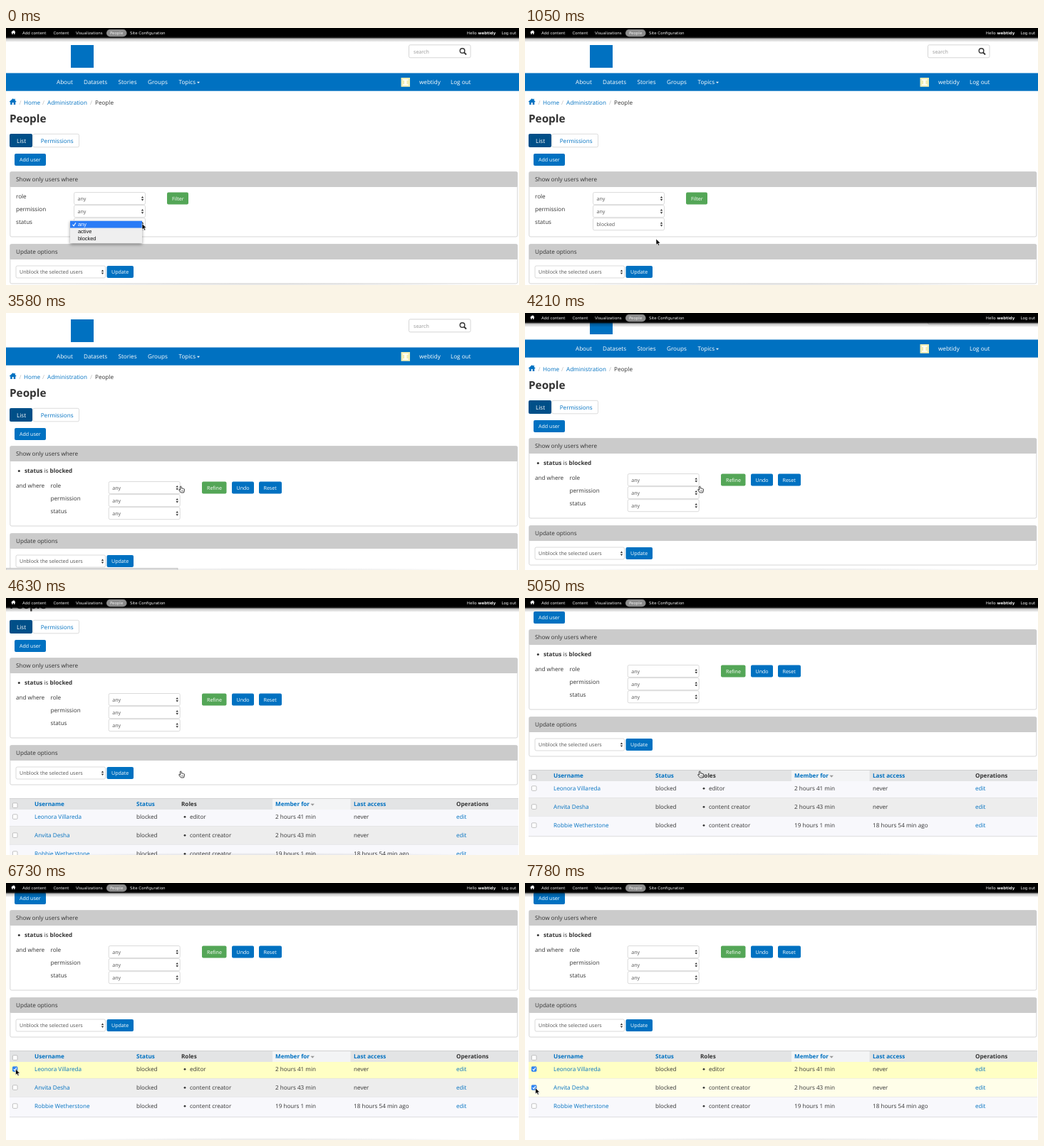
Animation of 720x362 px, one loop 7.99 s. Source, as an HTML page:

```html
<!DOCTYPE html>
<html lang="en">
<head>
<meta charset="utf-8">
<title>People</title>
<style>
html, body { margin: 0; width: 100%; height: 100%; overflow: hidden; background: #fff; }
svg { display: block; width: 720px; height: 362px; font: 8.15px "Open Sans", sans-serif; text-rendering: geometricPrecision; }
</style>
</head>
<body>
<svg id="stage" viewBox="0 0 720 362"></svg>
<script>
const BLUE = '#0071c1', GREEN = '#54a657', INK = '#333', USER = 'webtidy';

// Drawing helpers: each returns SVG markup
const rect = (x, y, w, h, fill, more = '') => `<rect x="${x}" y="${y}" width="${w}" height="${h}" fill="${fill}" ${more}/>`;
const text = (x, y, s, fill = INK, more = '') => `<text x="${x}" y="${y}" fill="${fill}" ${more}>${s}</text>`;
const path = (d, fill, more = '') => `<path d="${d}" fill="${fill}" ${more}/>`;
const group = (id, body, more = '') => `<g id="${id}" ${more}>${body}</g>`;
const small = (x, y, s, fill, more = '') => text(x, y, s, fill, 'font-size="7.1" ' + more);
const bold = 'font-weight="700"';

const button = (x, y, w, s, fill = BLUE, pad = 7) =>
  rect(x, y, w, 17, fill, 'rx="2"') + small(x + pad, y + 11.1, s, '#fff');

const select = (x, y, w, s, id = '') => {
  const ax = x + w - 4, ay = y + 8.7;
  return rect(x, y, w, 17, '#fff', 'rx="2" stroke="#ccc" stroke-width=".7"') +
    small(x + 5, y + 11.2, s, '#555', id && `id="${id}"`) +
    path(`M${ax - 1.7} ${ay - .8}h3.4l-1.7-2.5zM${ax - 1.7} ${ay + .8}h3.4l-1.7 2.5z`, INK);
};

const panel = (y, h, title) =>
  rect(5.8, y, 712, h, '#fff', 'rx="2" stroke="#ccc" stroke-width=".8"') +
  rect(5.5, y, 712.5, 21.5, '#cbcbcb', 'rx="1.5"') + text(14, y + 13.3, title);

const house = (x, y, s, fill) =>
  path('M0 4.6L5 0l1.9 1.7V.5h1.3v2.4L10 4.6l-.7.8L8.6 4.8V9H6V6H4v3H1.4V4.8l-.7.6z', fill, `transform="translate(${x} ${y}) scale(${s})"`);

const header =
  rect(91, 24, 32, 32, BLUE) +
  rect(565.5, 23.8, 86.5, 18, '#fff', 'rx="2" stroke="#ccc" stroke-width=".8"') +
  small(572, 35.5, 'search', '#999') +
  '<circle cx="640.5" cy="32" r="3.3" fill="none" stroke="#333" stroke-width="1.4"/>' +
  path('M643 34.5l3 3', 'none', 'stroke="#333" stroke-width="1.8"') +
  rect(0, 63.5, 720, 25.2, BLUE) +
  [[71, 'About'], [109, 'Datasets'], [157.5, 'Stories'], [199, 'Groups'], [242.5, 'Topics'], [580, USER], [624, 'Log out']]
    .map(([x, s]) => text(x, 79, s, '#fff')).join('') +
  path('M268 75.8h4l-2 2.2z', '#fff') +
  rect(554.5, 70, 12.5, 12.8, '#f1edb4') + path('M557 72h7.5v2h-2v5h2v2H557v-2h2v-5h-2z', '#fffef2') +
  house(4.8, 99.2, .98, BLUE) +
  [[18.5, '/', '#bbb'], [25, 'Home', BLUE], [51, '/', '#bbb'], [58, 'Administration', BLUE], [118, '/', '#bbb'], [125, 'People', INK]]
    .map(([x, s, c]) => text(x, 107.5, s, c)).join('') +
  text(5, 132.6, 'People', INK, bold + ' font-size="15.3"') +
  rect(5, 149, 32, 19, '#004f88', 'rx="2"') + text(15, 161.5, 'List', '#fff') +
  rect(38, 149.3, 64.5, 18.5, '#fff', 'rx="2" stroke="#d4d4d4" stroke-width=".8"') + text(48.7, 161.5, 'Permissions', BLUE) +
  button(12, 177, 44, 'Add user');

const fields = (labelX, x, y, id = '') => ['role', 'permission', 'status'].map((s, i) =>
  text(labelX, y + 8.2 + i * 18, s) + select(x, y + i * 18.1, 100, 'any', i == 2 ? id : '')).join('');

const filterForm = panel(202.5, 91.5, 'Show only users where') +
  fields(14, 95.5, 231.6, 'status') +
  group('filter', button(226, 231.5, 30, 'Filter', GREEN)) +
  group('focus', button(226, 231.5, 30, 'Filter', '#3d8b40') +
    rect(225.7, 231.2, 30.8, 17.6, 'none', 'rx="2" stroke="#62a5e8" stroke-width="1.5"'));

const refineForm = panel(202.5, 112.5, 'Show only users where') +
  '<circle cx="18.3" cy="237.5" r="1.5" fill="#333"/>' +
  text(26, 239.8, `<tspan ${bold}>status</tspan> is <tspan ${bold}>blocked</tspan>`) +
  text(14, 260.6, 'and where') + fields(62.5, 144.2, 252.5) +
  button(275, 252.4, 34.5, 'Refine', GREEN) + button(317, 252.4, 31, 'Undo', BLUE, 6.5) + button(355, 252.4, 32, 'Reset', BLUE, 6.5);

const update = panel(304.5, 55.5, 'Update options') +
  select(14, 335, 125.5, 'Unblock the selected users') + button(141.5, 335, 37.5, 'Update', BLUE, 6.5);

const checkbox = y => rect(9.4, y - 3.2, 6.6, 6.6, '#fff', 'rx="1.2" stroke="#aaa" stroke-width=".7"');
const columns = [40, 183, 258, 378, 488, 632];
const rows = [
  ['Leonora Villareda', 'blocked', 'editor', '2 hours 41 min', 'never', 'edit'],
  ['Anvita Desha', 'blocked', 'content creator', '2 hours 43 min', 'never', 'edit'],
  ['Robbie Wetherstone', 'blocked', 'content creator', '19 hours 1 min', '18 hours 54 min ago', 'edit']
];
const rowBox = [[416, 23.5, '#f8f8fc'], [439.5, 26, '#ededed'], [465.5, 28.5, '#f8f8fc']];
const marked = ['#ffffc4', '#fffee9'];

const table = rect(5, 400.5, 714, 15.5, '#e3e4e5') + rect(374, 400.5, 109.5, 15.5, '#f3f4f5') +
  rect(5, 400.3, 714, .7, '#c4c4c4') + checkbox(410) +
  ['Username', 'Status', 'Roles', 'Member for', 'Last access', 'Operations'].map((s, i) =>
    text(i == 2 ? 246 : columns[i], 411, s, i == 2 || i == 5 ? INK : BLUE, bold)).join('') +
  path('M427.5 407.8h5.4l-2.7 3z', '#999') +
  rows.map((cells, r) => {
    const [y, h, fill] = rowBox[r], mid = 426 + r * 26;
    return rect(5, y, 714, h, fill) +
      (r < 2 ? group('mark' + r, rect(5, y, 714, h, marked[r])) : '') +
      rect(5, y + h - .5, 714, .6, '#ccc') + checkbox(mid) +
      (r < 2 ? group('tick' + r, rect(9, mid - 3.5, 7.2, 7.2, '#2f87f3', 'rx="1.4"') +
        path(`M10.7 ${mid + .2}l1.5 1.7 2.6-3.8`, 'none', 'stroke="#fff" stroke-width="1.1"')) : '') +
      `<circle cx="251" cy="${mid + .3}" r="1.4" fill="#333"/>` +
      cells.map((s, i) => text(columns[i], mid + 2.8, s, i % 5 ? INK : BLUE)).join('');
  }).join('');

const options = ['any', 'active', 'blocked'];
const popup = rect(90, 271, 101, 32, '#efefef', 'filter="url(#shadow)"') +
  options.map((s, i) => group('option' + i, rect(90, 271.8 + i * 9.8, 101, 9.8, '#2b7cf6')) +
    text(101, 279.2 + i * 9.8, s, '#111', `id="label${i}" font-size="7.4" font-family="Liberation Sans, Arial, sans-serif"`)).join('') +
  path('M93.5 276.8l1.6 2 2.8-4.6', 'none', 'id="check" stroke="#fff" stroke-width="1.1"');

const menuFont = 'font-size="5.5" font-family="DejaVu Sans, sans-serif"';
const menu = rect(0, 0, 720, 20, 'url(#bar)') + house(7.2, 3.2, .62, '#fff') +
  rect(141, 2, 28.5, 10.3, '#8c8c8c', 'rx="5.1"') +
  [[23, 'Add content'], [66.5, 'Content'], [98, 'Visualizations'], [146, 'People'], [174, 'Site Configuration'],
   [646.8, `Hello <tspan ${bold}>${USER}</tspan>`], [695.5, 'Log out']]
    .map(([x, s]) => text(x, 9.2, s, '#eee', menuFont)).join('');

const arrow = path('M0 0v8.4l1.9-1.7 1.3 2.9 1.5-.7-1.3-2.8h2.6z', '#000', 'stroke="#fff" stroke-width=".6"');
const hand = path('M-.9 0q.9-1 1.7 0l.4 2.7q.8-.6 1.5.1.9-.4 1.4.4 1-.2 1.1.8L5 6.2 4.2 8.5H.2L-2.6 4.9q-.2-1.4 1.2-.7l.7.6z', '#fff', 'stroke="#111" stroke-width=".8" stroke-linejoin="round"') +
  path('M1 5v2M2.3 5v2M3.6 5v2', 'none', 'stroke="#111" stroke-width=".4"');

document.getElementById('stage').innerHTML = `<defs>
  <linearGradient id="bar" x2="0" y2="1"><stop offset=".6"/><stop offset=".68" stop-opacity=".85"/><stop offset=".76" stop-opacity=".25"/><stop offset="1" stop-opacity="0"/></linearGradient>
  <radialGradient id="glow" cy="1"><stop offset="0" stop-opacity=".09"/><stop offset=".6" stop-opacity=".05"/><stop offset="1" stop-opacity="0"/></radialGradient>
  <filter id="shadow" x="-20%" y="-30%" width="140%" height="180%"><feDropShadow dx="0" dy="2" stdDeviation="2" flood-opacity=".4"/></filter></defs>` +
  rect(0, 0, 720, 362, '#fff') +
  group('page', header + group('first', filterForm) + group('refined', refineForm + table) + group('update', update)) +
  rect(50, 356, 620, 6, 'url(#glow)') +
  group('loading', rect(0, 359.5, 241, 3, '#dcdcdc', 'stroke="#b5b5b5" stroke-width=".6"')) +
  group('menu', menu) + group('popup', popup) +
  group('arrow', arrow) + group('hand', hand);

const el = id => document.getElementById(id);
const show = (id, on) => el(id).style.display = on ? '' : 'none';
const move = (id, x, y) => el(id).setAttribute('transform', `translate(${x} ${y})`);

// Pointer stops: step, x, y
const stops = [[0, 191, 275.5], [3, 184, 297], [5, 184, 297], [9, 245.3, 244.5], [26, 245.3, 244.5],
  [30, 13.5, 262], [32, 13.5, 262], [34, 13, 287.5], [36, 13, 287.5], [37, 14.7, 288.7], [38, 14.7, 288.7]];
const scroll = [0, 26, 75, 118, 145, 158, 164];

function pointer(n) {
  const i = stops.findIndex(s => s[0] > n), a = stops[i - 1], b = stops[i];
  const p = (n - a[0]) / (b[0] - a[0]), e = p * p * (3 - 2 * p);
  return [a[1] + (b[1] - a[1]) * e, a[2] + (b[2] - a[2]) * e];
}

function draw(n) {
  const refined = n >= 16, hasMenu = n < 16 || n >= 18, open = n < 5;
  const offset = hasMenu ? -scroll[Math.max(0, Math.min(6, n - 19))] : -15;
  move('page', 0, offset);
  move('update', 0, refined ? 21 : 0);
  show('first', !refined);
  show('refined', refined);
  show('menu', hasMenu);
  show('loading', n >= 11 && n < 18);
  show('filter', n < 9);
  show('focus', n >= 9);
  el('status').textContent = open ? 'any' : 'blocked';

  show('popup', open);
  const over = n < 2 ? 0 : n < 3 ? 1 : 2;
  options.forEach((_, i) => {
    show('option' + i, i == over);
    el('label' + i).setAttribute('fill', i == over ? '#fff' : '#111');
  });
  el('check').setAttribute('stroke', over ? '#111' : '#fff');

  [31, 34].forEach((at, i) => ['mark', 'tick'].forEach(id => show(id + i, n >= at)));

  const pointing = n >= 9 && n <= 26;
  show('hand', pointing);
  show('arrow', !pointing);
  move(pointing ? 'hand' : 'arrow', ...pointer(n));
}

const start = performance.now();
let last = -1;
function tick() {
  const t = (performance.now() - start) % 7990;
  const n = Math.min(37, Math.floor((t < 3370 ? Math.min(t, 3359) : t - 10) / 210));
  if (n != last) draw(last = n);
  requestAnimationFrame(tick);
}
tick();
</script>
</body>
</html>
```
